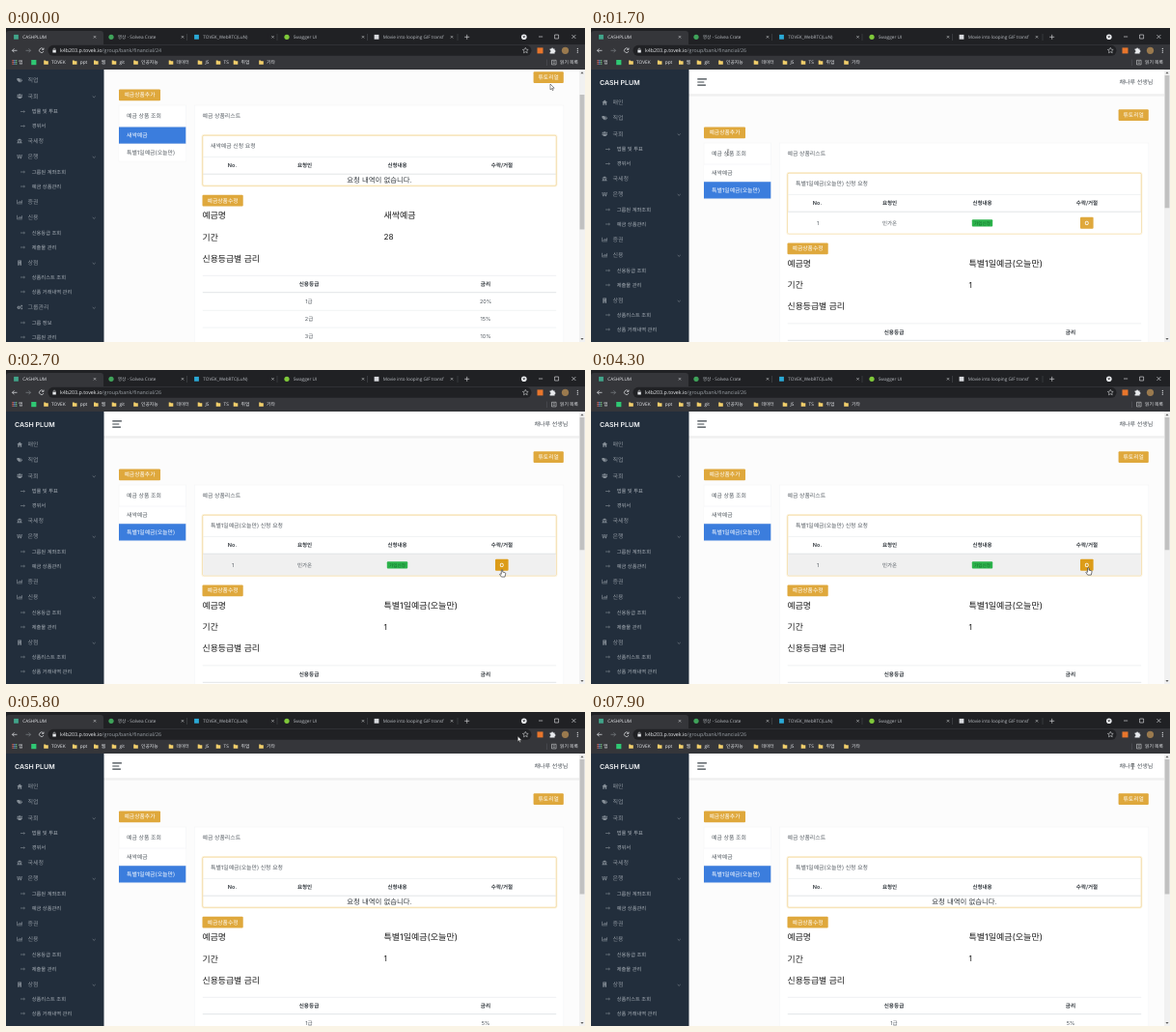
Write an HTML page that moves like this. It is 600 px wide and 325 px high and loops after 8100 ms.

```html
<!DOCTYPE html>
<html lang="ko">
<head>
<meta charset="utf-8">
<title>예금 상품관리</title>
<style>
html, body { margin: 0; width: 100%; height: 100%; overflow: hidden; background: #fcfcfc; }
svg { display: block; width: 100%; height: 100%; }
text { font-family: Inter, "Noto Sans CJK KR", "Noto Sans CJK", sans-serif; text-rendering: geometricPrecision; white-space: pre; }
.ui text { font-family: "Open Sans", "Noto Sans CJK KR", "Noto Sans CJK", sans-serif; }
</style>
</head>
<body>
<svg id="stage" viewBox="0 0 600 325" xmlns="http://www.w3.org/2000/svg"></svg>
<script>
const LOOP = 8100, STEP = 100, SCROLL = 39;
const GOLD = '#dfa83c', BLUE = '#3b7ddd', LINE = '#e3e6e9', INK = '#535a61';
const stage = document.getElementById('stage');

function add(parent, tag, attrs = {}) {
  const node = document.createElementNS('http://www.w3.org/2000/svg', tag);
  for (const key in attrs) node.setAttribute(key, attrs[key]);
  return parent.appendChild(node);
}
const group = (parent, attrs) => add(parent, 'g', attrs);
const rect = (p, x, y, width, height, fill, more) => add(p, 'rect', { x, y, width, height, fill, ...more });
const dot = (p, cx, cy, r, fill) => add(p, 'circle', { cx, cy, r, fill });
const stroke = (p, d, color, width = 0.6) =>
  add(p, 'path', { d, fill: 'none', stroke: color, 'stroke-width': width });
const move = (node, x, y) => node.setAttribute('transform', `translate(${x} ${y})`);
const show = (node, on) => node.setAttribute('display', on ? 'inline' : 'none');

// y is the optical middle of the line
function label(p, x, y, str, size, fill, more) {
  const node = add(p, 'text', { x, y: y + size * 0.37, 'font-size': size, fill, ...more });
  node.textContent = str;
  return node;
}
const centered = (p, x, y, str, size, fill, more) =>
  label(p, x, y, str, size, fill, { 'text-anchor': 'middle', ...more });
const bold = { 'font-weight': 600 };

function button(p, x, y, w, str) {
  const g = group(p);
  rect(g, x, y, w, 11.8, GOLD, { rx: 1 });
  centered(g, x + w / 2, y + 5.7, str, 5.8, '#fff');
  return g;
}

// ---- scrolling page ----
const page = group(stage);
rect(page, 101, 43, 493, 400, '#fcfcfc');

function buildNavbar() {
  [0.06, 0.05, 0.03].forEach((opacity, i) => rect(page, 101, 68 + i, 493, 1, '#000', { opacity }));
  rect(page, 101, 43, 493, 25.3, '#fff');
  stroke(page, 'M110.3 52.8h9.6M110.3 56h7M110.3 59.2h8.6', '#3d444b', 1.2);
  label(page, 547.5, 56, '채나루 선생님', 6, '#495057');
}

const ICONS = {
  home: 'M0 3L3.2 0 6.4 3H5.4V6H3.8V4H2.6V6H1V3Z',
  tags: 'M0 .6H2.6L5 3.2 2.7 5.6 0 3ZM3.4 .6H4L6.6 3.2 4 5.7 3.6 5.3 5.6 3.2Z',
  people: 'M2.2 .3h2v2h-2ZM.3 1h1.4v1.5H.3ZM4.8 1h1.4v1.5H4.8ZM0 3h6.4v1.4H5v1.4H1.4V4.4H0Z',
  bank: 'M0 2L3 .2 6 2V2.5H0ZM.8 3H1.7V4.7H2.5V3H3.5V4.7H4.3V3H5.2V4.7H6V5.6H0V4.7H.8Z',
  won: 'M0 .6H1L1.7 3.8 2.6 .6H3.5L4.4 3.8 5.1 .6H6.1L5 5.4H4L3 2.4 2.1 5.4H1.1ZM0 2.2H6.2V2.7H0ZM0 3.4H6.2V3.9H0Z',
  chart: 'M0 .5H.7V4.9H6.2V5.6H0ZM1.4 3H2.2V4.4H1.4ZM2.7 1.8H3.5V4.4H2.7ZM4 2.5H4.8V4.4H4ZM5.2 1H6V4.4H5.2Z',
  shop: 'M1 0H5.2V6H3.7V4.5H2.5V6H1ZM2 1V1.7H2.7V1ZM3.5 1V1.7H4.2V1ZM2 2.7V3.4H2.7V2.7ZM3.5 2.7V3.4H4.2V2.7Z',
  gears: 'M1 1.4H3.4L4.4 3 3.4 5H1L0 3.2ZM1.7 2.5V3.8H2.8V2.5ZM4.6 .3H6L6.6 1.3 6 2.4H4.6ZM4.9 3.6H6.1L6.6 4.6 6 5.6H4.8Z'
};
// [middle y, label, icon, opens a submenu]; entries without an icon are sub-items
const MENU = [
  [77, '매인', 'home'], [93, '직업', 'tags'],
  [109.5, '국회', 'people', 1], [125.5, '법률 및 투표'], [140.5, '경위서'],
  [156, '국세청', 'bank'],
  [172, '은행', 'won', 1], [188, '그룹원 계좌조회'], [203, '예금 상품관리'],
  [219, '증권', 'chart'],
  [235, '신용', 'chart', 1], [251, '신용등급 조회'], [266, '제출물 관리'],
  [282, '상점', 'shop', 1], [297, '상품리스트 조회'], [312, '상품 거래내역 관리'],
  [328, '그룹관리', 'gears', 1], [344, '그룹 정보'], [359, '그룹원 관리']
];
function buildSidebar() {
  rect(page, 0, 43, 101.5, 400, '#222e3c');
  label(page, 9, 56.3, 'CASH PLUM', 7, '#f4f6f8', bold);
  for (const [y, name, icon, opens] of MENU) {
    if (icon) {
      add(page, 'path', { d: ICONS[icon], fill: '#858e97', 'fill-rule': 'evenodd', transform: `translate(11.4 ${y - 2.6}) scale(.88)` });
      label(page, 22.5, y, name, 6, '#8c949d');
      if (opens) stroke(page, `M89.7 ${y}l1.5 1.4 1.5-1.4`, '#858e97', 0.6);
    } else {
      stroke(page, `M15 ${y}h4.4m-1.1-1l1.1 1-1.1 1`, '#a3aab2', 0.45);
      label(page, 26.7, y, name, 5.25, '#a9b0b8');
    }
  }
}

buildNavbar();
buildSidebar();
button(page, 546.6, 84.2, 31.2, '튜토리얼');
button(page, 117, 102.5, 43, '예금상품추가');

const card = (x, y, w, h) => rect(page, x, y, w, h, '#fff', { stroke: '#f5f6f7', 'stroke-width': 0.7 });
card(117, 119, 69.3, 58);
card(195.3, 119, 382.5, 300);
label(page, 125, 129.6, '예금 상품 조회', 5.9, INK);
label(page, 203.5, 129.6, '예금 상품리스트', 5.9, INK);

const products = [['새싹예금', 141.4], ['특별1일예금(오늘만)', 159.1]].map(([name, top]) => {
  const box = rect(page, 117, top, 69.3, 17.4, '#fff');
  return { top, box, text: label(page, 125, top + 8.5, name, 5.9, INK) };
});
stroke(page, 'M117 141h69.3M117 158.9h69.3', '#e9ebee', 0.4);

// request box
const glow = rect(page, 203.2, 149.6, 367.6, 53, 'none', { stroke: '#f8e6bb', 'stroke-width': 1.4, rx: 1.5, opacity: 0.4 });
const frame = rect(page, 203.8, 150.2, 366.4, 52, '#fff', { stroke: '#f1cf84', 'stroke-width': 0.7, rx: 1.2 });
const requestTitle = label(page, 212, 160.6, '', 5.9, INK);
stroke(page, 'M204.2 172.5h365.6', LINE, 0.5);
[['No.', 234.5], ['요청인', 309.5], ['신청내용', 405.5], ['수락/거절', 514]]
  .forEach(([name, x]) => centered(page, x, 181.2, name, 5.5, '#30363c', bold));

const emptyNote = centered(page, 387, 196.3, '요청 내역이 없습니다.', 7.4, '#33383d');
const request = group(page);
const requestRow = rect(request, 204.2, 190.4, 365.6, 22.2, '#fff');
centered(request, 235, 201.7, '1', 5.5, INK);
centered(request, 309.5, 201.7, '민가온', 5.5, INK);
rect(request, 394.8, 198.2, 21.4, 7.4, '#2cb34c', { rx: 1 });
centered(request, 405.5, 201.8, '가입신청', 4.6, '#14692a');
const accept = rect(request, 507, 195.8, 13.6, 12, GOLD, { rx: 1 });
centered(request, 513.8, 201.7, 'O', 5.8, '#fff', bold);
stroke(page, 'M204.2 190.2h365.6', '#cfd3d7', 0.6);

// product details
const details = group(page);
button(details, 203.5, 211.8, 42.2, '예금상품수정');
['예금명', '기간', '신용등급별 금리'].forEach((name, i) => label(details, 203.5, 233 + i * 22.3, name, 8.85, '#1a1a1a'));
const productName = label(details, 391.5, 233, '', 9, '#1a1a1a');
const period = label(details, 391.5, 255.3, '', 8.2, '#1a1a1a');
stroke(details, 'M203.8 295.3h366.4', LINE, 0.6);
centered(details, 314, 304.2, '신용등급', 5.6, '#30363c', bold);
centered(details, 497, 304.2, '금리', 5.6, '#30363c', bold);
stroke(details, 'M203.8 312.7h366.4', '#cfd3d7', 0.6);
const rates = [0, 1, 2].map(i => {
  const y = 322.4 + i * 17.8;
  centered(details, 314, y, `${i + 1}급`, 5.5, INK);
  stroke(details, `M203.8 ${y + 8.9}h366.4`, LINE, 0.5);
  return centered(details, 497, y, '', 5.5, INK);
});

// ---- scrollbar ----
rect(stage, 594, 43, 6, 282, '#f1f1f1');
const thumb = rect(stage, 594.6, 49, 4.8, 139.5, '#c1c1c1');
add(stage, 'path', { d: 'M595.4 47.2l1.6-2 1.6 2ZM595.4 321l1.6 2 1.6-2Z', fill: '#606060' });

// ---- browser frame ----
const ui = group(stage, { class: 'ui' });
const PALE = '#e8eaed', GREY = '#9aa0a6';
rect(ui, 0, 0, 600, 18, '#202124');
rect(ui, 0, 17, 600, 26, '#35363a');
add(ui, 'path', { d: 'M0 18V6Q0 3 3 3H98Q101 3 101 6V18Z', fill: '#35363a' });

function tab(x, name, closeX, color, round) {
  const active = x < 100;
  if (round) dot(ui, x, 9.3, 2.6, color);
  else rect(ui, x - 2.4, 6.9, 4.8, 4.8, color);
  label(ui, x + 6.8, 9.3, name, 4.7, active ? PALE : '#b9bdc2');
  rect(ui, closeX - 5, 5, 8, 9, active ? '#35363a' : '#202124');
  stroke(ui, `M${closeX - 1.2} 8.1l2.4 2.4m0-2.4l-2.4 2.4`, PALE, 0.5);
}
tab(10.5, 'CASHPLUM', 92, '#41a58a');
tab(109, '영상 - Solvea Crate', 183, '#3fa35a', true);
tab(197.5, 'TOVEK_WebRTC(LuN)', 276.5, '#2aa9d6');
tab(291, 'Swagger UI', 370, '#7fc93a', true);
tab(384, 'Movie into looping GIF transf', 462, '#d8dade');
[187.5, 281, 374.5, 468].forEach(x => stroke(ui, `M${x} 6v7`, '#5f6368', 0.4));
stroke(ui, 'M475.2 9.3h5m-2.5-2.5v5', PALE, 0.6);
dot(ui, 536.8, 9.3, 2.8, PALE);
add(ui, 'path', { d: 'M535.4 8.6h2.8l-1.4 1.7Z', fill: '#202124' });
stroke(ui, 'M552 9h4.2M568.6 7h4v4h-4ZM586.4 7l4 4m0-4l-4 4', PALE, 0.6);

stroke(ui, 'M11.5 23.3h-5m2-2l-2 2 2 2', PALE, 0.7);
stroke(ui, 'M20.5 23.3h5m-2-2l2 2-2 2', '#7d8186', 0.7);
stroke(ui, 'M38.5 21.6a2.3 2.3 0 1 0 .5 2.4M39 20.6v1.8h-1.8', PALE, 0.7);
rect(ui, 43.5, 17.8, 501, 11, '#202124', { rx: 5.5 });
rect(ui, 48.4, 22.8, 3.4, 2.7, PALE);
stroke(ui, 'M49.1 23v-1a1 1 0 0 1 2 0v1', PALE, 0.5);
const url = label(ui, 56, 23.2, '', 5.3, PALE);
url.textContent = 'k4b203.p.tovek.io';
const path = add(url, 'tspan', { fill: GREY });
add(ui, 'path', { d: 'M538.3 20.3l.9 1.9 2 .2-1.5 1.4.5 2-1.9-1.1-1.8 1.1.4-2-1.5-1.4 2-.2Z', fill: 'none', stroke: PALE, 'stroke-width': 0.5 });
rect(ui, 550.5, 20.4, 6, 6, '#e8762c');
add(ui, 'path', { d: 'M563.6 21.4h1.6a.9.9 0 0 1 1.8 0h1.6v1.7a.9.9 0 0 1 0 1.8v1.6h-5v-1.6a.9.9 0 0 0 0-1.8Z', fill: PALE });
dot(ui, 579.5, 23.3, 3.6, '#9a7a4e');
[21.4, 23.3, 25.2].forEach(y => dot(ui, 592.3, y, 0.6, PALE));

for (let i = 0; i < 9; i++) {
  rect(ui, 6.5 + (i % 3) * 1.8, 33 + Math.floor(i / 3) * 1.8, 1.2, 1.2, ['#ea6a5e', '#6ba5e8', '#6dbb79'][i % 3]);
}
label(ui, 13, 35.6, '앱', 4.8, PALE);
rect(ui, 26.2, 33, 5.2, 5.2, '#2fc873');
[['TOVEK', 47], ['ppt', 76.7], ['웹', 98.8], ['git', 117.5], ['인공지능', 140], ['데이터', 176.5],
 ['JS', 206.5], ['TS', 225.5], ['취업', 243.5], ['기타', 270]].forEach(([name, x]) => {
  add(ui, 'path', { d: `M${x - 7.8} 33.4h1.7l.6.8h2.3v3.6h-4.6Z`, fill: '#f2cf6b' });
  label(ui, x, 35.6, name, 4.8, PALE);
});
stroke(ui, 'M560.5 32.5v6.5', '#5f6368', 0.4);
stroke(ui, 'M565.5 33.3h4.6v4.6h-4.6ZM566.8 34.8h2M566.8 36.3h2', PALE, 0.5);
label(ui, 574, 35.6, '읽기 목록', 4.8, PALE);

// ---- pointer ----
const pointer = group(stage);
const shapes = {
  arrow: add(pointer, 'path', { d: 'M0 0V5.8L1.4 4.6 2.3 6.6 3.2 6.2 2.3 4.2H4.2Z', fill: '#fff', stroke: '#222', 'stroke-width': 0.5 }),
  hand: add(pointer, 'path', { d: 'M-.7 .5Q0-.5 .7 .5V2.6L3.3 3.3Q3.8 3.5 3.7 4.6L3 7.6H-.6L-2.4 5Q-2.4 3.9-.7 4.8Z', fill: '#fff', stroke: '#222', 'stroke-width': 0.6 }),
  beam: stroke(pointer, 'M-1.2-2.8H1.2M0-2.8V2.8M-1.2 2.8H1.2', '#444', 0.5)
};

// [time, x, y]
const TRAIL = [
  [0, 564, 58], [900, 564, 58], [1500, 146, 133], [1600, 141.5, 127.5], [1800, 142.5, 130],
  [2600, 512, 206], [2700, 514, 206.5], [3300, 515.3, 204.5], [4900, 515.3, 204.5],
  [5800, 530.3, 25], [6000, 562, 32], [6400, 240, 110], [6700, 155.5, 148.5], [6800, 156, 149],
  [7100, 156, 149], [7300, 190, 140], [7700, 559.5, 55.5], [7900, 561.3, 56.3], [LOOP, 561.3, 56.3]
];
function pointerAt(t) {
  const i = Math.max(1, TRAIL.findIndex(k => k[0] > t));
  const [t0, x0, y0] = TRAIL[i - 1], [t1, x1, y1] = TRAIL[i];
  const u = (t - t0) / (t1 - t0), e = u * u * (3 - 2 * u);
  return [x0 + (x1 - x0) * e, y0 + (y1 - y0) * e];
}

const SPROUT = { name: '새싹예금', id: 24, period: '28', rates: [20, 15, 10], selected: 0 };
const SPECIAL = { name: '특별1일예금(오늘만)', id: 26, period: '1', rates: [5, 4, 3], selected: 1 };

function render(t) {
  const product = t < 1700 ? SPROUT : SPECIAL;
  const pending = t >= 1700 && t < 4400;
  const scroll = product === SPROUT ? SCROLL : 0;
  const [x, y] = pointerAt(t);
  const within = (left, top, w, h) => x >= left && x <= left + w && y + scroll >= top && y + scroll <= top + h;

  move(page, 0, -scroll);
  move(details, 0, pending ? 10.6 : 0);
  thumb.setAttribute('y', scroll ? 69 : 49);
  thumb.setAttribute('height', pending ? 137.3 : 139.5);
  frame.setAttribute('height', pending ? 62.6 : 52);
  glow.setAttribute('height', pending ? 63.8 : 53.2);
  show(request, pending);
  show(emptyNote, !pending);

  path.textContent = `/group/bank/financial/${product.id}`;
  requestTitle.textContent = `${product.name} 신청 요청`;
  productName.textContent = product.name;
  period.textContent = product.period;
  rates.forEach((node, i) => node.textContent = `${product.rates[i]}%`);

  let overItem = false;
  products.forEach((item, i) => {
    const hover = within(117, item.top, 69.3, 17.4), active = i === product.selected;
    overItem = overItem || hover;
    item.box.setAttribute('fill', active ? BLUE : hover ? '#e9ecef' : '#fff');
    item.text.setAttribute('fill', active ? '#fff' : INK);
  });
  const overAccept = pending && within(507, 195.8, 13.6, 12);
  requestRow.setAttribute('fill', pending && within(204, 190.4, 366, 22.2) ? '#f0f0f0' : '#fff');
  accept.setAttribute('fill', overAccept ? '#dc9c18' : GOLD);

  const overText = !scroll && (within(125, 126, 36, 7) || within(547, 53, 35, 6));
  const kind = overItem || overAccept ? 'hand' : overText ? 'beam' : 'arrow';
  for (const name in shapes) show(shapes[name], name === kind);
  move(pointer, x, y);
}

function tick() {
  const t = performance.now() % LOOP;
  render(Math.floor(t / STEP) * STEP);
  requestAnimationFrame(tick);
}
tick();
</script>
</body>
</html>
```
